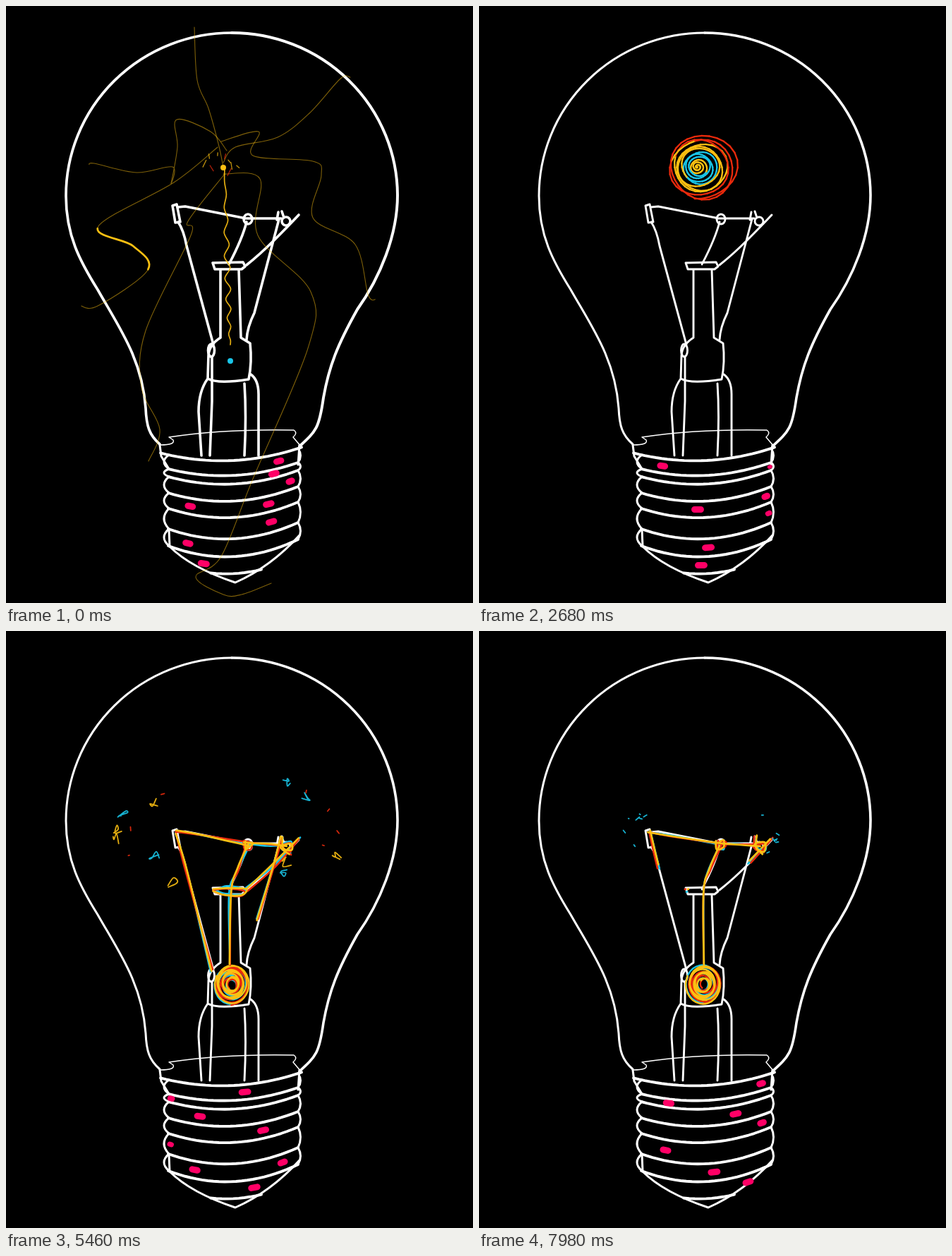
Write an HTML page with a canvas that moves like this. It is 662 by 846 pixels and loops after 8 s.

```html
<!DOCTYPE html>
<html lang="en">
<head>
<meta charset="utf-8">
<title>Light bulb</title>
<style>
html, body { margin: 0; width: 100%; height: 100%; overflow: hidden; background: #000; }
canvas { display: block; }
</style>
</head>
<body>
<canvas id="stage" width="662" height="846"></canvas>
<script>
const ctx = document.getElementById('stage').getContext('2d');
const LOOP = 8, TAU = Math.PI * 2;
const WHITE = '#fff', CYAN = '#19c5e8', YELLOW = '#fcc012', RED = '#ea2a0c', PINK = '#ff0066';
const LAYERS = [CYAN, RED, YELLOW];

const clamp = v => Math.max(0, Math.min(1, v));
const ramp = (t, from, to) => clamp((t - from) / (to - from));
const rnd = n => { const v = Math.sin(n * 127.1 + 3.7) * 43758.5453; return v - Math.floor(v); };
const jitter = (n, size) => (rnd(n) - 0.5) * size;
const parse = text => text.split(' ').map(p => p.split(',').map(Number));

function smooth(points) {
  const path = new Path2D(), last = points.length - 1;
  path.moveTo(...points[0]);
  for (let i = 0; i < last; i++) {
    const a = points[Math.max(0, i - 1)], b = points[i];
    const c = points[i + 1], d = points[Math.min(last, i + 2)];
    path.bezierCurveTo(b[0] + (c[0] - a[0]) / 6, b[1] + (c[1] - a[1]) / 6,
      c[0] - (d[0] - b[0]) / 6, c[1] - (d[1] - b[1]) / 6, c[0], c[1]);
  }
  return path;
}

function curve(points) {
  let length = 0;
  for (let i = 1; i < points.length; i++) {
    length += Math.hypot(points[i][0] - points[i - 1][0], points[i][1] - points[i - 1][1]);
  }
  return { length: length * 1.02, path: smooth(points) };
}

function stroke(path, color, width, alpha = 1) {
  ctx.globalAlpha = alpha;
  ctx.strokeStyle = color;
  ctx.lineWidth = width;
  ctx.stroke(path);
  ctx.globalAlpha = 1;
}

function strokePart(line, from, to, color, width, alpha = 1) {
  from = clamp(from); to = clamp(to);
  if (to <= from) return;
  ctx.setLineDash([(to - from) * line.length, 9999]);
  ctx.lineDashOffset = -from * line.length;
  stroke(line.path, color, width, alpha);
  ctx.setLineDash([]);
}

function dot(x, y, r, color) {
  ctx.fillStyle = color;
  ctx.beginPath();
  ctx.arc(x, y, r, 0, TAU);
  ctx.fill();
}

// ---- Bulb ----
const glassLeft = new Path2D('M218,621C203,608 199,595 198,570C193,500 160,455 130,402C105,362 85,325 85,269A235,231 0 0 1 320,38');
const glassRight = new Path2D('M320,38A235,231 0 0 1 555,268C555,325 530,385 498,430C470,480 458,510 450,555C444,598 440,602 416,624');
const rim = new Path2D('M219,622Q240,622 237,615L231,611Q310,599 408,601Q414,605 407,611L418,624');
const supports = new Path2D('M244,306Q252,318 256,340L294,480M387,302L352,435Q342,455 341,473M236,283L242,281 247,306 240,307ZM386,292L384,303M391,291L394,300M244,285L254,284 340,301 390,301M415,296Q400,312 380,332T341,367M341,306Q335,330 316,366');
const holder = new Path2D('M293,364L336,363 339,369 334,373 296,373ZM304,374V470Q288,480 287,495L286,528Q300,536 344,529Q349,505 346,478L333,470 330,374M286,528Q273,546 273,575L277,637M292,497V560L289,637M338,535Q341,580 338,637M347,522Q358,530 358,550V637');
const cone = new Path2D('M231,742L232,766Q262,796 325,817Q375,795 416,750');
for (const [x, y, rx, ry] of [[343, 302, 6, 7], [397, 305, 6, 6], [291, 488, 4.5, 9]]) {
  supports.moveTo(x + rx, y);
  supports.ellipse(x, y, rx, ry, 0, 0, TAU);
}

// Screw threads sag in the middle and rise to the right.
const threadLeft = [636, 656, 667, 690, 712, 741, 765, 788];
const DROP = 9;

function threadY(i, x) {
  const u = (x - 322) / 92, sag = 8 + 1.2 * i;
  return threadLeft[i] + sag - DROP / 2 * u - (sag + DROP / 2) * u * u;
}

const threads = new Path2D(), edges = new Path2D();
threadLeft.forEach((y, i) => {
  const last = i === threadLeft.length - 1;
  const from = last ? 290 : i ? 230 : 219, to = last ? 362 : i ? 414 : 421;
  threads.moveTo(from, threadY(i, from));
  for (let x = from + 8; x <= to; x += 8) threads.lineTo(x, threadY(i, x));
  if (i > 5) return;
  const next = threadLeft[i + 1];
  edges.moveTo(231, y);
  edges.quadraticCurveTo(217, (y + next) / 2, 231, next);
  edges.moveTo(414, y - DROP);
  edges.quadraticCurveTo(421, (y + next) / 2 - DROP, 414, next - DROP);
});
edges.moveTo(218, 622); edges.lineTo(220, 638); edges.lineTo(231, 656);
edges.moveTo(416, 622); edges.lineTo(414, 650);

function drawBulb(t) {
  const bold = t < 1.6 ? 0.7 : 0;
  stroke(glassLeft, WHITE, 3 + bold);
  stroke(glassRight, WHITE, 3.6 + bold / 2);
  stroke(rim, WHITE, 1.5);
  stroke(supports, WHITE, 2.9 + bold);
  stroke(holder, WHITE, 2.9 + bold);
  stroke(threads, WHITE, 3.9);
  stroke(edges, WHITE, 3);
  stroke(cone, WHITE, 3);
}

// ---- Pink dashes turning round the screw, one lane between two threads ----
const lanes = [
  { speed: 0.33, phases: [2.35, -0.05] }, { speed: 0.26, phases: [2.25, -1.12] },
  { speed: 0.4, phases: [2.65, -1.15] }, { speed: 0.22, phases: [2.15, 0.85] },
  { speed: 0.25, phases: [2.2, -1.1] }, { speed: 0.3, phases: [0.8, -0.7] },
  { speed: 0.147, phases: [1.1] }
];

function drawDashes(t) {
  lanes.forEach(({ speed, phases }, lane) => phases.forEach(phase => {
    const angle = phase + speed * t;
    if (angle < 0.22 || angle > 3.05) return;
    const x = 322 - 92 * Math.cos(angle), half = 4.5 * Math.sin(angle);
    const y = px => (threadY(lane, px) + threadY(lane + 1, px)) / 2;
    const line = new Path2D();
    line.moveTo(x - half, y(x - half));
    line.lineTo(x + half, y(x + half));
    stroke(line, PINK, 9 * clamp(Math.sin(angle) * 3));
  }));
}

// ---- Lightning, each bolt running outwards ----
const bolts = [
  '308,228 301,195 287,145 271,105 267,30',
  '308,222 325,200 385,186 430,152 474,103 488,101',
  '313,205 290,178 242,161 243,200 234,251 236,228 185,236 125,223 118,226',
  '300,200 238,250 131,312 180,340 201,374 130,425 104,424',
  '310,238 258,305 262,325 198,460 192,540 218,600 202,645',
  '308,238 360,245 357,325 432,405 428,485 350,670 305,780 269,809 308,834 334,834 376,818',
  '305,192 358,178 350,212 435,220 447,240 435,300 495,338 514,411 529,412'
].map(text => curve(parse(text)));

// A wavering trace up the stem to the burst.
const stem = curve(Array.from({ length: 18 }, (_, i) => {
  const k = i / 17;
  return [318 - 8 * k + (i % 2 ? 4 : -4) * Math.sin(k * Math.PI), 480 - 250 * Math.pow(k, 1.3)];
}));

function drawBurst(color, alpha) {
  for (let i = 0; i < 9; i++) {
    const a = Math.PI + i * 0.45, d = 14 + 20 * rnd(i);
    const x = 306 + Math.cos(a) * d, y = 226 + Math.sin(a) * d * 0.7;
    const mark = new Path2D();
    mark.moveTo(x, y);
    mark.lineTo(x + jitter(i + 20, 10), y + 3 + 8 * rnd(i + 40));
    stroke(mark, i % 4 ? color : RED, 1.3, alpha);
  }
}

function drawLightning(t) {
  const fade = 1 - ramp(t, 1.25, 1.6);
  if (!fade) return;
  const climb = ramp(t, 0.06, 0.4), spread = ramp(t, 0.4, 0.9);
  const color = climb < 1 ? YELLOW : CYAN;
  for (const bolt of bolts) {
    strokePart(bolt, spread, 1, YELLOW, 1.1, 0.5);
    strokePart(bolt, 0, spread, CYAN, 1.1, 0.55 * fade);
    const head = (t - 0.4) * 2;
    strokePart(bolt, head - 0.24, head, CYAN, 2.6);
  }
  const tail = 0.49 + t * 2;
  strokePart(bolts[3], tail, tail + 0.24, YELLOW, 2.7);
  strokePart(stem, climb, 1, YELLOW, 1.7, 0.9);
  strokePart(stem, 0, climb, CYAN, 1.7, fade);
  drawBurst(color, 0.75 * fade);
  if (t < 0.95) dot(308, 229, 4, color);
  if (t < 0.14) dot(318, 503, 4, CYAN);
}

// ---- Spiral whose colours spread from its centre ----
const waves = [RED, YELLOW, CYAN, YELLOW, RED].map((color, i) => (
  { color, start: 0.8 + 0.2 * i + 0.08 * i * i, speed: 26 - 2 * i }));

function spiralPoint(a) {
  const base = a / TAU * 3.9, k = base / 47;
  const r = base * (1 + 0.06 * Math.sin(a * 1.37) + 0.035 * Math.sin(a * 2.61));
  return [309 + 7 * k + r * Math.cos(a) * 1.03, 228 + k + r * Math.sin(a) * 0.98, base];
}

function drawSpiral(t) {
  const step = TAU / 28, erased = (t - 3.8) * 60;
  for (let a = step; a < TAU * 12.3; a += step) {
    const [x, y, r] = spiralPoint(a);
    const edge = r + clamp(r / 12) * 3.5 * Math.sin(a * 0.63);
    const wave = waves.findLast(w => edge < (t - w.start) * w.speed);
    if (!wave || r < erased) continue;
    const line = new Path2D();
    line.moveTo(...spiralPoint(a - step).slice(0, 2));
    line.lineTo(x, y);
    stroke(line, wave.color, 2.3);
  }
}

// ---- Glowing filament: grows from the socket, then ebbs in places ----
const glows = [
  { line: '318,472 318,370 327,338 343,303', from: 4.6 },
  { line: '343,302 275,290 241,285', from: 4.9 },
  { line: '343,302 370,303 398,304', from: 4.9 },
  { line: '241,285 255,338 291,482', from: 5.1, ebb: 0.77 },
  { line: '415,295 380,332 341,367', from: 5.1, ebb: 0.6 },
  { line: '294,368 312,363 338,366 334,374 310,374 295,368', from: 5, ebb: 1 },
  { line: '390,293 380,332 357,408', from: 5.1, ebb: 4 },
  { line: '392,292 393,309 405,311 404,299 390,304 402,316', from: 5.1 },
  { line: '338,298 348,298 348,307 338,308 338,298', from: 4.9 }
].map(g => ({ ebb: 0, ...g, line: parse(g.line) }));

function drawGlow(t) {
  const boil = Math.floor(t * 8), ebbing = Math.pow(ramp(t, 5.6, 8), 1.5);
  LAYERS.forEach((color, c) => glows.forEach(({ line, from, ebb }, g) => {
    const shown = (ramp(t, from, from + 0.3) - ebb * ebbing) * (1.1 - 0.05 * c);
    if (shown <= 0) return;
    const moved = line.map(([x, y], i) => {
      const seed = boil * 31 + c * 7 + g * 13 + i * 3;
      return [x + jitter(seed, 5), y + jitter(seed + 0.5, 5)];
    });
    strokePart(curve(moved), 0, shown, color, 2.7);
  }));
}

// ---- Scribbled ball in the socket ----
function drawBall(t) {
  const size = ramp(t, 4.2, 4.8), boil = Math.floor(t * 8);
  if (!size) return;
  LAYERS.forEach((color, c) => {
    const seed = boil * 5 + c, points = [];
    const cx = 319 + jitter(seed, 4), cy = 500 + jitter(seed + 0.3, 4);
    for (let i = 0; i < 112; i++) {
      const a = i * TAU / 14 + c * 2;
      const r = (7 + 18 * i / 112 + 2.5 * Math.sin(a * 0.7 + seed)) * size;
      points.push([cx + r * Math.cos(a) * 0.96, cy + r * Math.sin(a) * 1.08]);
    }
    stroke(smooth(points), color, 2.4);
  });
}

// ---- Sparks thrown from both ends of the filament; the first burst is curly ----
const bursts = [4.75, 5.64, 6.65, 7.75];

function drawSparks(t) {
  bursts.forEach((start, b) => {
    const age = t - start;
    if (age < 0 || age > 0.95) return;
    for (let i = 0; i < (b ? 44 : 26); i++) {
      const seed = b * 100 + i, c = i % 3, left = i % 2;
      if (age < c * 0.24 || age > 0.6 + rnd(seed + 0.1) * 0.35) continue;
      const a = jitter(seed, 3.2) + (left ? Math.PI : 0);
      const d = 14 + age * (40 + 60 * rnd(seed + 0.2));
      const x = (left ? 238 : 396) + Math.cos(a) * d, y = 286 + Math.sin(a) * d * 0.9;
      const curly = !b && c !== 1, size = curly ? 16 : 6;
      const points = Array.from({ length: curly ? 5 : 2 }, (_, k) => [
        x + jitter(seed + k * 0.7 + 0.4, size), y + jitter(seed + k * 0.9 + 0.6, size)]);
      stroke(smooth(points), LAYERS[c], 1.8, 0.9);
    }
  });
}

function draw(t) {
  ctx.fillStyle = '#000';
  ctx.fillRect(0, 0, 662, 846);
  ctx.lineCap = ctx.lineJoin = 'round';
  drawBulb(t);
  drawLightning(t);
  drawSpiral(t);
  drawBall(t);
  drawGlow(t);
  drawSparks(t);
  drawDashes(t);
}

const began = performance.now();
function tick() {
  draw((performance.now() - began) / 1000 % LOOP);
  requestAnimationFrame(tick);
}
tick();
</script>
</body>
</html>
```
